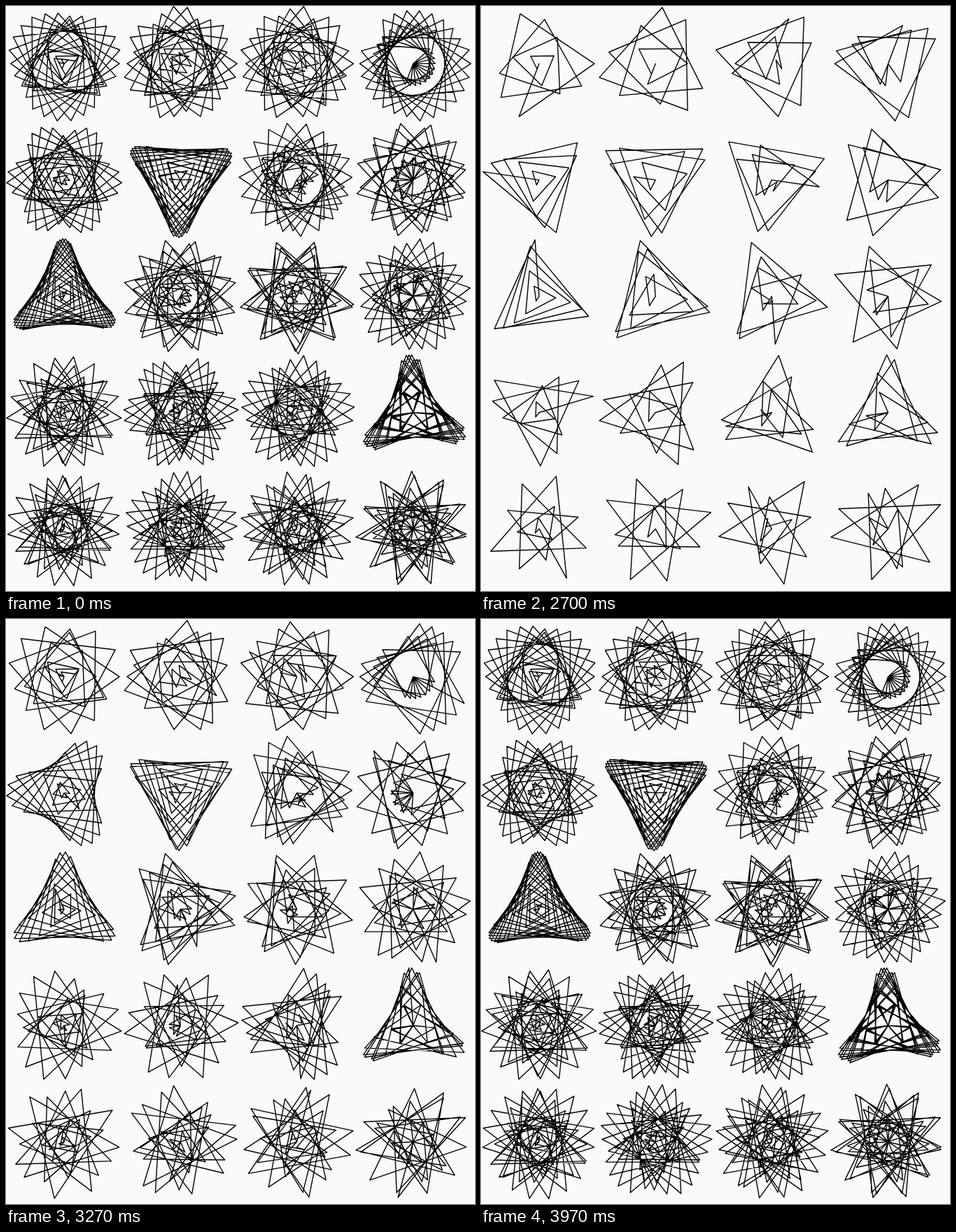
An HTML page with a canvas for the animation above (6.33 s loop, 670 by 836 pixels).

```html
<!DOCTYPE html>
<html lang="en">
<head>
<meta charset="utf-8">
<title>Polar polygons</title>
<style>
  html, body { margin: 0; width: 100%; height: 100%; overflow: hidden; background: #f9fafc; }
  canvas { display: block; }
</style>
</head>
<body>
<canvas id="stage" width="670" height="836"></canvas>
<script>
const ctx = document.getElementById('stage').getContext('2d');
const LOOP = 6330, CLEAR = 2270, LAST = 64;
const COLS = 4, ROWS = 5, PITCH = 166.2, RADIUS = 82.5;
const TAU = 2 * Math.PI;
let shown = null;

// Index of the newest vertex, advancing at 30 ticks per second; -1 is blank.
function newestVertex(t) {
  if (t < CLEAR) return LAST;
  const tick = Math.floor((t + 5) * 0.03) - 71;
  return tick < 0 ? -1 : Math.min(LAST, Math.floor(1 + 1.32 * tick));
}

// Closed polygon through r = sin(a i), angle = b i.
function rose(cx, cy, petals, turns, n) {
  ctx.beginPath();
  for (let i = 0; i <= n; i++) {
    const r = RADIUS * Math.sin(TAU * petals * i / 64);
    const angle = TAU * turns * i / 65;
    ctx.lineTo(cx + r * Math.cos(angle), cy + r * Math.sin(angle));
  }
  ctx.closePath();
  ctx.stroke();
}

function draw(n) {
  ctx.fillStyle = n < 0 ? '#fefefe' : '#f9fafc';
  ctx.fillRect(0, 0, 670, 836);
  if (n < 0) return;
  ctx.strokeStyle = '#000';
  ctx.lineWidth = 1.4;
  ctx.lineJoin = 'round';
  for (let row = 0; row < ROWS; row++) {
    for (let col = 0; col < COLS; col++) {
      rose(83 + PITCH * col, 82.4 + PITCH * row, col + 1, row + 20, n);
    }
  }
}

const start = performance.now();
function tick() {
  const n = newestVertex((performance.now() - start) % LOOP);
  if (n !== shown) draw(shown = n);
  requestAnimationFrame(tick);
}
tick();
</script>
</body>
</html>
```
